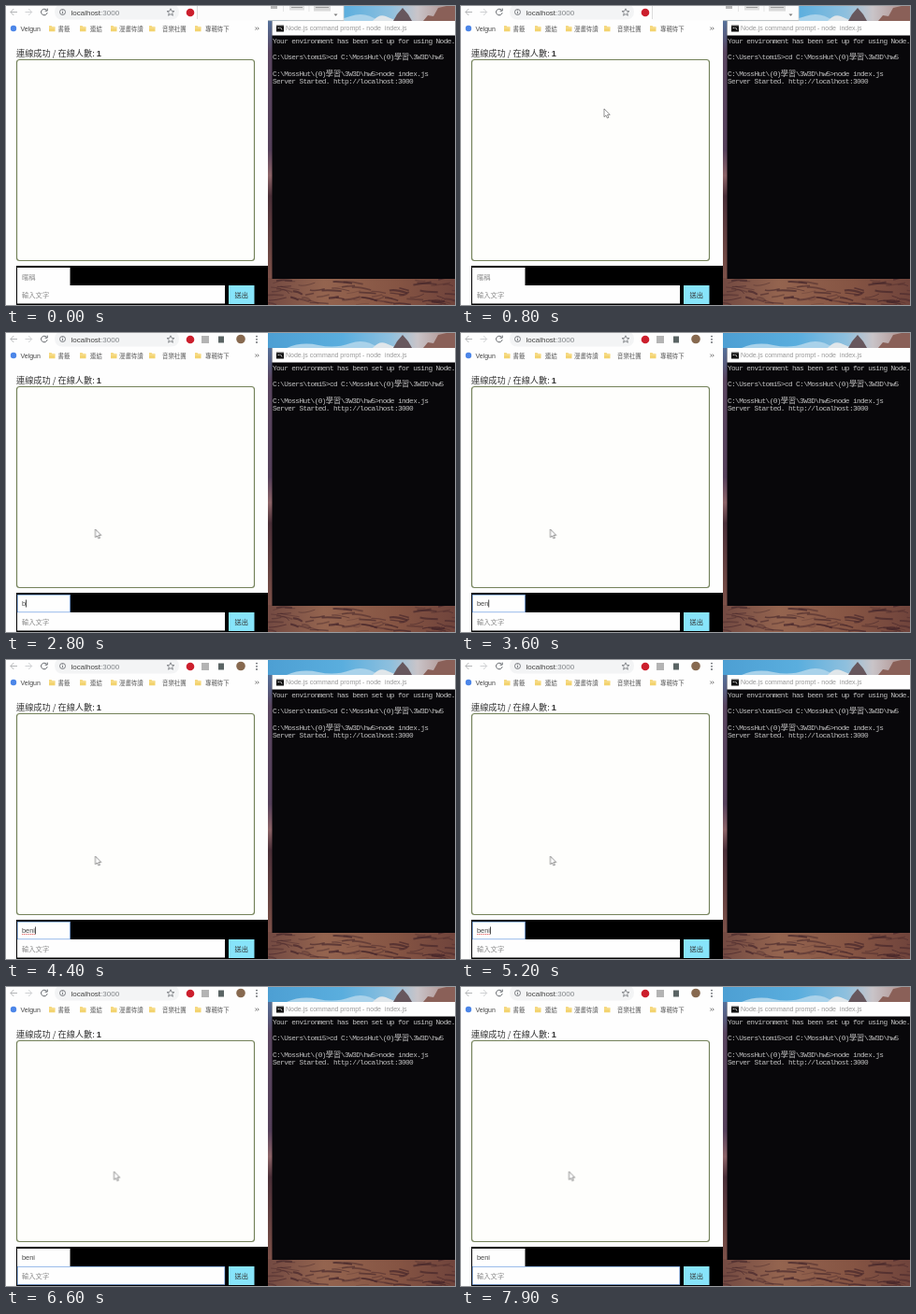
Write an HTML page that moves like this. It is 480 px wide and 320 px high and loops after 8000 ms.

```html
<!DOCTYPE html>
<html lang="zh-Hant">
<head>
<meta charset="utf-8">
<title>Chat room demo</title>
<style>
html, body { margin: 0; width: 100%; height: 100%; overflow: hidden; background: #6d4646; }
svg { position: absolute; left: 0; top: 0; width: 480px; height: 320px; display: block; }
text { white-space: pre; }
.ui { font-family: "Noto Sans CJK TC", "Noto Sans CJK", "Noto Sans", sans-serif; font-size: 7.3px; font-weight: 300; fill: #333; }
.bookmarks { font-size: 6.4px; fill: #555; }
.status { font-size: 9.2px; }
.status tspan { font-family: "Liberation Sans", sans-serif; font-weight: 700; }
.hint { fill: #8a8a8a; }
.latin { font-family: "Liberation Sans", "Open Sans", sans-serif; fill: #444; }
.console { font: 7.8px "Liberation Mono", monospace; letter-spacing: -.62px; fill: #c4c4c4; }
.console .wide { font: 300 8.1px "Noto Sans CJK TC", "Noto Sans CJK", sans-serif; letter-spacing: 0; }
.ring { fill: none; stroke: #6a9be0; stroke-width: .7; opacity: 0; }
#recorder { animation: recorder 8s step-end infinite; }
#nameRing { animation: nameRing 8s step-end infinite; }
#msgRing { animation: msgRing 8s step-end infinite; }
#cursor { animation: pointer 8s ease-in-out infinite; }
@keyframes recorder { 0% { opacity: 1 } 18.75%, 100% { opacity: 0 } }
@keyframes nameRing { 0% { opacity: 0 } 18.75% { opacity: 1 } 75%, 100% { opacity: 0 } }
@keyframes msgRing { 0% { opacity: 0 } 75%, 100% { opacity: 1 } }
@keyframes pointer {
  0%, 2.5% { transform: translate(290px, -14px) }
  8.75%, 11.25% { transform: translate(153px, 110px) }
  18.1%, 20% { transform: translate(40px, 288px) }
  23.75%, 68.75% { transform: translate(95.5px, 210px) }
  73.75%, 76.25% { transform: translate(80px, 308px) }
  81.25%, 100% { transform: translate(115.5px, 197.5px) }
}
</style>
</head>
<body>
<svg viewBox="0 0 480 320">
  <defs>
    <linearGradient id="sky">
      <stop offset="0" stop-color="#4d9fd3"/><stop offset=".4" stop-color="#5aaede"/>
      <stop offset=".66" stop-color="#8fc0de"/><stop offset=".8" stop-color="#c9c4c8"/>
      <stop offset="1" stop-color="#a98682"/>
    </linearGradient>
    <linearGradient id="side" x2="0" y2="1">
      <stop offset="0" stop-color="#54709a"/><stop offset=".12" stop-color="#5a4660"/>
      <stop offset=".5" stop-color="#55405a"/><stop offset=".6" stop-color="#8d6468"/>
      <stop offset=".68" stop-color="#4a2f38"/><stop offset="1" stop-color="#7d5148"/>
    </linearGradient>
    <linearGradient id="ground">
      <stop offset="0" stop-color="#734a42"/><stop offset=".3" stop-color="#94644f"/>
      <stop offset=".7" stop-color="#855443"/><stop offset="1" stop-color="#70443c"/>
    </linearGradient>
    <g id="folder">
      <path d="M0 1.2h2.600l.8 1h3.100v5h-6.500z" fill="#f3d36f"/>
      <path d="M0 3.400h6.500" stroke="#fbe6a4" stroke-width=".7"/>
    </g>
  </defs>

  <!-- wallpaper -->
  <rect x="280" width="200" height="32" fill="url(#sky)"/>
  <path d="M300 16q16-7 34-3t34-2 30 5z" fill="#a9d2ea"/>
  <path d="M392 16q7-8 14-5t12 5z" fill="#e0e6ea"/>
  <path d="M414 16l4-7 6-7 6 7 4 7z" fill="#67575d"/>
  <path d="M446 16l5-6 6 1 5-9 9-2h9v16z" fill="#8a6058"/>
  <rect x="280" y="16" width="6" height="276" fill="url(#side)"/>
  <rect x="280" y="291" width="200" height="29" fill="url(#ground)"/>
  <g id="cracks" fill="none" stroke="#412329"/>

  <!-- browser -->
  <rect width="280" height="320" fill="#fefefe"/>
  <g fill="none" stroke="#5f6368">
    <path d="M12 6.500H5M8.300 3L4.800 6.500 8.300 10" stroke="#b4b6b8"/>
    <path d="M20.500 6.500h7M24.200 3l3.500 3.500-3.500 3.500" stroke="#cfd1d3"/>
    <path d="M43.300 4.300a3.300 3.300 0 1 0 .8 2.900M44.200 2.600v2.600h-2.600"/>
  </g>
  <rect x="52" y="-2" width="133" height="16.500" rx="8" fill="#f3f4f5"/>
  <circle cx="60.500" cy="6.500" r="3" fill="none" stroke="#5f6368" stroke-width=".8"/>
  <path d="M60.500 6v2.300M60.500 4.400v.9" stroke="#5f6368" stroke-width=".8"/>
  <text class="latin" x="69.500" y="9.600" font-size="8">localhost<tspan fill="#808488">:3000</tspan></text>
  <path d="M176 2.800l1.100 2.600 2.800.2-2.200 1.800.7 2.800-2.400-1.500-2.400 1.500.7-2.800-2.200-1.800 2.800-.2z" fill="none" stroke="#5f6368" stroke-width=".7"/>
  <circle cx="197" cy="7" r="4.300" fill="#cc1f2d"/>
  <rect x="209" y="3" width="8" height="8" fill="#b4b4b4"/>
  <rect x="227" y="3.500" width="6" height="7" fill="#5a6464"/>
  <circle cx="251" cy="6.500" r="4.800" fill="#87694f"/>
  <g fill="#5f6368"><circle cx="268" cy="3.600" r=".9"/><circle cx="268" cy="6.800" r=".9"/><circle cx="268" cy="10" r=".9"/></g>

  <circle cx="8" cy="24" r="3.200" fill="#4c86e8"/>
  <text class="latin" x="15.500" y="26.600" font-size="7">Velgun</text>
  <g class="ui bookmarks">
    <use href="#folder" x="46" y="20"/><text x="55.500" y="26.600">書籤</text>
    <use href="#folder" x="79" y="20"/><text x="90" y="26.600">連結</text>
    <use href="#folder" x="112" y="20"/><text x="121" y="26.600">漫畫待讀</text>
    <use href="#folder" x="153" y="20"/><text x="167" y="26.600">音樂社團</text>
    <use href="#folder" x="202" y="20"/><text x="213" y="26.600">專輯待下</text>
  </g>
  <path d="M266.500 22.600l1.500 1.500-1.500 1.500M268.700 22.600l1.500 1.500-1.500 1.500" fill="none" stroke="#555" stroke-width=".8"/>

  <text class="ui status" x="11" y="54.300">連線成功 / 在線人數: <tspan>1</tspan></text>
  <rect x="11.500" y="57.500" width="254" height="215" rx="3" fill="#fefefc" stroke="#74825a" stroke-width="1.200"/>
  <rect x="11" y="278" width="269" height="42" fill="#000"/>
  <rect x="12" y="280" width="56.500" height="19" fill="#fefefe"/>
  <rect x="12" y="299" width="222" height="19.500" fill="#fefefe"/>
  <rect x="238" y="299" width="27.500" height="20" fill="#87e4fa"/>
  <text class="ui" x="244.500" y="312">送出</text>
  <text class="ui hint" x="17" y="311.800">輸入文字</text>
  <text id="hint" class="ui hint" x="17" y="292.500">暱稱</text>
  <text id="name" class="latin" x="17" y="292" font-size="7.400"></text>
  <path id="squiggle" fill="none" stroke="#e05050" stroke-width=".8" stroke-dasharray="1.200 .6"/>
  <rect id="nameRing" class="ring" x="12.300" y="280.300" width="56" height="18.500"/>
  <rect id="msgRing" class="ring" x="12.300" y="299.300" width="221.500" height="19"/>
  <rect id="caret" width=".8" height="8" fill="#222"/>

  <!-- console -->
  <rect x="284.500" y="16" width="196" height="276" fill="#08070a"/>
  <rect x="284.500" y="16" width="196" height="15.500" fill="#fefefe"/>
  <rect x="289" y="20" width="8" height="7.500" fill="#111"/>
  <path d="M289 20.700h8" stroke="#bbb" stroke-width="1.200"/>
  <path d="M290.500 23.500h2M293.500 23l1.500 2.500" stroke="#eee" stroke-width=".8"/>
  <text class="latin" x="299" y="26.400" font-size="7" style="fill:#999">Node.js command prompt - node  index.js</text>
  <g class="console">
    <text x="285" y="39.500">Your environment has been set up for using Node.</text>
    <text x="285" y="56.900">C:\Users\tomi5&gt;cd C:\MossHut\(0)<tspan class="wide">學習</tspan>\3W3D\hw5</text>
    <text x="285" y="74.500">C:\MossHut\(0)<tspan class="wide">學習</tspan>\3W3D\hw5&gt;node index.js</text>
    <text x="285" y="82.700">Server Started. http://localhost:3000</text>
  </g>

  <!-- recorder window -->
  <g id="recorder">
    <rect x="204" y="-1" width="157" height="16.500" fill="#fcfcfc"/>
    <path d="M204.500 0v14M361 0v16" stroke="#d4d4d4" stroke-width=".8"/>
    <path d="M280 15.600h81" stroke="#b5b5b5" stroke-width=".8"/>
    <rect x="283" y="-1" width="7" height="4" fill="#b8b8b8"/>
    <rect x="303" y="-1" width="16" height="5.500" fill="#e1e1e1"/>
    <rect x="329" y="-1" width="18" height="6.500" fill="#dadada"/>
    <path d="M305 1.500h12M331 1.500h14" stroke="#9b9b9b"/>
    <path d="M296.500 0v6M324 0v6" stroke="#dcdcdc" stroke-width=".7"/>
    <path d="M350.500 8.500h4l-2 2.200z" fill="#777"/>
  </g>

  <g id="cursor">
    <path d="M0 0v8.800l2-1.800 1.400 3 1.500-.7-1.400-2.900h2.700z" fill="#fff" stroke="#666" stroke-width=".7"/>
  </g>
</svg>
<script>
const LOOP = 8000, BLINK = 1060;
const NAME = "beni";
const keys = [2800, 3100, 3400, 3900];
const focusName = 1500, focusMsg = 6000;
const el = id => document.getElementById(id);
const [label, hint, caret, squiggle] = ["name", "hint", "caret", "squiggle"].map(el);

// Dark cracks scattered over the stone ground
function addCracks(count) {
  let seed = 7;
  const random = () => (seed = seed * 16807 % 2147483647) / 2147483647;
  for (let i = 0; i < count; i++) {
    const crack = document.createElementNS("http://www.w3.org/2000/svg", "path");
    const x = 278 + random() * 200, y = 293 + random() * 27;
    crack.setAttribute("d", `M${x} ${y}q6 ${random() * 4 - 2} ${8 + random() * 14} ${random() * 8 - 4}`);
    crack.setAttribute("stroke-width", .6 + random() * 1.6);
    crack.setAttribute("opacity", .3 + random() * .4);
    el("cracks").append(crack);
  }
}

function draw() {
  const t = performance.now() % LOOP;
  const pressed = keys.filter(k => k <= t);
  const count = pressed.length;
  const inName = t >= focusName && t < focusMsg;

  label.textContent = NAME.slice(0, count);
  hint.style.opacity = count ? 0 : 1;
  const width = count ? label.getComputedTextLength() : 0;

  const since = inName ? pressed[count - 1] || focusName : focusMsg;
  const lit = t >= focusName && (t - since) % BLINK < BLINK / 2;
  caret.style.opacity = lit ? 1 : 0;
  caret.setAttribute("x", inName ? 17 + width : 17);
  caret.setAttribute("y", inName ? 285.5 : 305);
  squiggle.setAttribute("d", inName && count === NAME.length ? `M17 293.500h${width}` : "");

  requestAnimationFrame(draw);
}
addCracks(70);
draw();
</script>
</body>
</html>
```
